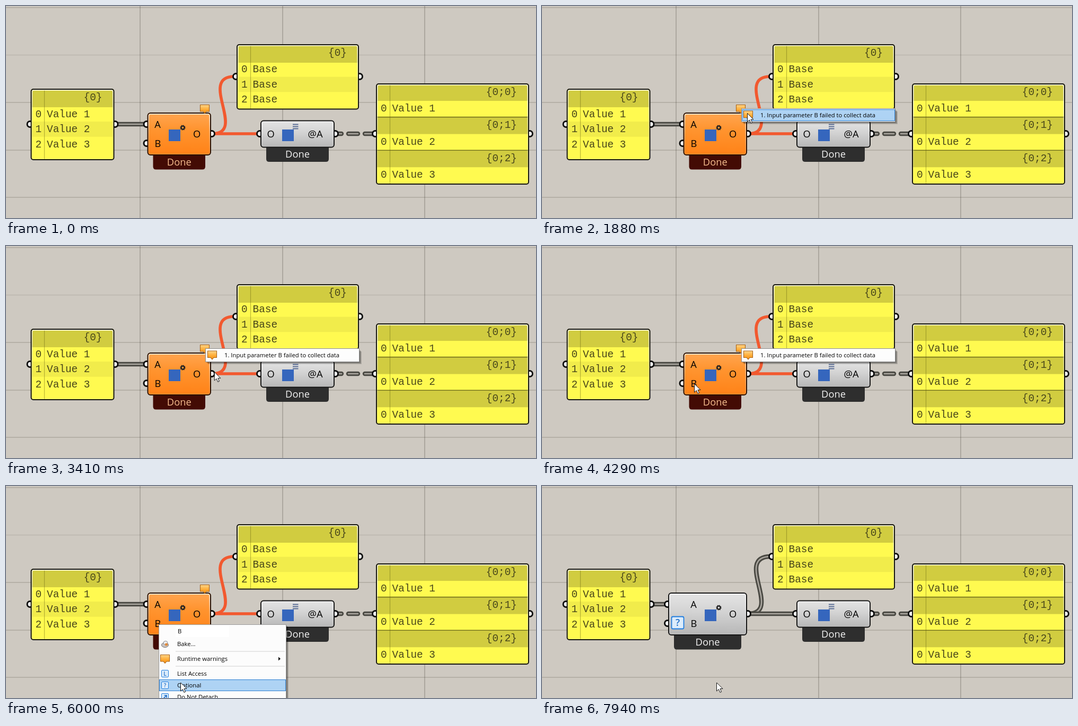
These frames come from a looping animation (1000 px wide and 400 px high, 8000 ms). An HTML page:

```html
<!DOCTYPE html>
<html lang="en">
<head>
<meta charset="utf-8">
<title>Node canvas</title>
<style>
html, body { margin: 0; width: 100%; height: 100%; overflow: hidden; background: #cec9c1; }
svg { display: block; width: 100vw; height: 100vh; }
text { white-space: pre; }
.mono { font: 19.4px "Liberation Mono", monospace; fill: #48461a; }
.ui { font: 18.3px "Open Sans", sans-serif; }
.menu { font: 11.25px "Open Sans", sans-serif; fill: #000; }
</style>
</head>
<body>
<svg id="stage" viewBox="0 0 1000 400" xmlns="http://www.w3.org/2000/svg"></svg>
<script>
const LOOP = 8000;
const CLICK_BALLOON = 1500, HOVER_ITEM = 1710, TIP_ON = 2400, LEAVE_ITEM = 3060;
const OPEN_MENU = 4620, PICK = 7470, FINISH = 7720;

// Cursor keys: time, x, y
const PATH = [
  [60, 440, 290], [400, 432, 282], [1250, 376, 193.5], [1500, 376, 193.5], [1800, 387, 202],
  [2000, 387, 202], [2400, 412, 214], [2750, 414, 215], [2940, 434, 222.5],
  [3150, 428, 230], [3950, 287, 259.5], [4900, 287, 259.5], [5850, 329, 370.5], [8000, 329, 370.5]
];

const line = (x1, y1, x2, y2, color, w = 1) =>
  `<path d="M${x1} ${y1}L${x2} ${y2}" stroke="${color}" stroke-width="${w}"/>`;
const rect = (x, y, w, h, fill, extra = "") =>
  `<rect x="${x}" y="${y}" width="${w}" height="${h}" fill="${fill}" ${extra}/>`;
const port = (x, y) =>
  `<circle cx="${x}" cy="${y}" r="5.5" fill="#fff" stroke="#0c0c0c" stroke-width="3"/>`;
const group = (id, body) => `<g id="${id}">${body}</g>`;

function label(cls, s, x, y, anchor = "start", fill = "") {
  const drop = { mono: 6.2, ui: 6.5, menu: 4 }[cls];
  const color = fill ? ` style="fill:${fill}"` : "";
  return `<text class="${cls}" x="${x}" y="${y + drop}" text-anchor="${anchor}"${color}>${s}</text>`;
}

function grid() {
  const rows = [[3, .2], [92.5, .11], [182, .2], [272, .2], [361, .2]];
  return rows.map(([y, a]) => line(0, y, 1000, y, `rgba(40,35,25,${a})`, 1.7)).join("") +
    [253, 522, 790].map(x => line(x, 0, x, 400, "rgba(40,35,25,.23)", 1.7)).join("");
}

// Dark outline with a light inner rim that fades downwards
const frame = (x, y, w, h, r, edge) =>
  rect(x + 1.7, y + 1.7, w - 3.4, h - 3.4, "none", `rx="${r - 1}" stroke="url(#rim)" stroke-width="1.6"`) +
  rect(x, y, w, h, "none", `rx="${r}" stroke="${edge}" stroke-width="2"`);

// Each branch: top, header bottom, path label, row values
function panel(x, y, w, h, split, branches) {
  const clip = `clip${x}`;
  let s = `<clipPath id="${clip}">${rect(x, y, w, h, "#000", 'rx="4"')}</clipPath>`;
  s += `<g clip-path="url(#${clip})">` + rect(x, y, w, h, "#fffa50");
  for (const b of branches) {
    s += rect(x, b.top, w, b.head - b.top, "#d1cc40");
    if (b.top > y) s += line(x, b.top, x + w, b.top, "#77741c", 1.6);
    s += label("mono", b.path, x + w - 22, b.pathY, "end");
    b.rows.forEach((v, i) => {
      const cy = b.rowY + i * 28.6;
      if (i % 2) s += rect(x, cy - 14, w, 28.6, "#f1ec4b");
      s += label("mono", i, x + 8, cy) + label("mono", v, x + 29.5, cy);
    });
  }
  s += line(x + split, y, x + split, y + h, "rgba(90,86,10,.4)", 1.2) + "</g>";
  return s + frame(x, y, w, h, 4, "#17170f");
}

function node(x, y, w, h, fill, edge, tag, tagFill, tagInk) {
  const b = y + h, l = x + 10, r = x + w - 10;
  return `<path d="M${l} ${b}H${r}V${b + 22}q0 5.5-5.5 5.5H${l + 5.5}q-5.5 0-5.5-5.5Z" fill="${tagFill}"/>` +
    label("ui", tag, x + w / 2, b + 13.3, "middle", tagInk) +
    rect(x, y, w, h, `url(#${fill})`, 'rx="5"') + frame(x, y, w, h, 5, edge);
}

const badge = (x, y) => rect(x - 11, y - 11, 22, 22, "#3566bd");

const gear = `<g transform="translate(333.5 229.5)"><circle r="3.1" fill="none" stroke="#222" stroke-width="2.4"/>` +
  `<circle r="4.5" fill="none" stroke="#222" stroke-width="1.2" stroke-dasharray="1.8 1.73"/></g>`;

const mergeParts = label("ui", "A", 286, 223.5, "middle") + label("ui", "B", 286.5, 259.5, "middle") +
  label("ui", "O", 360, 241.5, "middle") + badge(318, 244) + gear;

const balloon = (x, y) =>
  `<path d="M${x - 8.5} ${y - 7}h17v12.5h-5.5l-3 3.5-3-3.5h-5.5Z" fill="url(#amber)" stroke="#a86216" stroke-width="1.1" stroke-linejoin="round"/>`;

const tile = (x, y, size, s, font) =>
  rect(x - size / 2, y - size / 2, size, size, "#dcecfb", `rx="${size / 9}" stroke="#1f7de0" stroke-width="${size / 13}"`) +
  `<text x="${x}" y="${y + font * .36}" text-anchor="middle" style="font:600 ${font}px 'Open Sans',sans-serif" fill="#2370c8">${s}</text>`;

const CURVE = "M389 241C455 241 362 133 431 133", STRAIGHT = "M389 241H476";
const flatWire = d => `<path d="${d}" fill="none" stroke="#f2592f" stroke-width="5.6"/>`;
const tubeWire = (d, cap = "butt") => [["#4a4943", 8.4], ["#aaa69f", 2.6]].map(([c, w]) =>
  `<path d="${d}" fill="none" stroke="${c}" stroke-width="${w}" stroke-linecap="${cap}"/>`).join("");

function mergeNode(id, x, fill, edge, tag, tagFill, tagInk, extra = "") {
  return group(id, tubeWire(`M208 223H${x - 5}`) + port(205.5, 223) + port(x - 2, 223) + port(x - 2, 259) +
    node(x, 202, 386 - x, 79, fill, edge, tag, tagFill, tagInk) + mergeParts + extra);
}

const optionalTile = tile(256, 258, 23, "?", 18);
const gradient = (id, stops) => `<linearGradient id="${id}" x2="0" y2="1">` +
  stops.map(([o, c]) => `<stop offset="${o}" stop-color="${c}"/>`).join("") + "</linearGradient>";

const defs = "<defs>" + gradient("grey", [[0, "#e4e4e4"], [.45, "#d3d3d3"], [1, "#b6b6b6"]]) +
  gradient("orange", [[0, "#ffa550"], [.4, "#ff942f"], [1, "#ff8217"]]) +
  gradient("rim", [[0, "rgba(255,255,255,.9)"], [.5, "rgba(255,255,255,.35)"], [1, "rgba(255,255,255,.1)"]]) +
  gradient("amber", [[0, "#ffd58a"], [.5, "#ffb03c"], [1, "#f58e10"]]) + "</defs>";

const shadow = (x, y, w, h) => [5, 4, 3, 2].map(d => rect(x + d, y + d, w, h, "rgba(0,0,0,.14)")).join("");
const glow = (id, x, y, w, h) => rect(x, y, w, h, "#aed3f4", `id="${id}" stroke="#2c7fd2"`);

const popup = group("popup", shadow(376, 194, 290, 24) +
  rect(376.5, 193.5, 290, 25, "#fdfdfd", 'stroke="#8c8c8c"') + glow("popupGlow", 378, 195.5, 287.5, 21) +
  balloon(389, 205) + label("menu", "1. Input parameter B failed to collect data", 412, 205.7));

const tip = group("tip", shadow(412, 236, 219, 20) +
  rect(412.5, 236.5, 220, 20, "#fff", 'stroke="#767676"') +
  `<text class="menu" x="418" y="251" style="font-size:11.5px;fill:#3c3c3c">Click to copy warning text to clipboard.</text>`);

const ITEMS = [["Bake...", 298], ["Runtime warnings", 326], ["List Access", 354], ["Optional", 376], ["Do Not Detach", 398]];
const bakeIcon = `<ellipse cx="300" cy="300" rx="6.5" ry="4.5" fill="#c8c4c4" stroke="#77706c"/>` +
  `<ellipse cx="301" cy="296" rx="4" ry="3.5" fill="#eef0f3" stroke="#8a8a90"/><circle cx="302.5" cy="299" r="2.6" fill="#e08a3c"/>`;
const menu = group("menu", shadow(288, 261, 240, 160) +
  rect(288.5, 261.5, 240, 170, "#fcfcfc", 'stroke="#9a9a9a"') +
  rect(320, 264, 101, 21, "#fff") + label("menu", "B", 324, 273.5) +
  [312, 340].map(y => line(320, y, 526, y, "#d0d0d0")).join("") +
  glow("itemGlow", 289.5, 0, 238, 21) +
  ITEMS.map(([s, y]) => label("menu", s, 323, y)).join("") +
  bakeIcon + balloon(300, 325.5) + '<path d="M514 322.5v7l4-3.5Z" fill="#111"/>' +
  tile(300, 354, 13, "L", 10) + tile(300, 376, 13, "?", 10) + tile(300, 398, 13, "", 10) +
  '<path d="M297 401l6-6m-4.5 0h4.5v4.5" fill="none" stroke="#2370c8" stroke-width="1.7"/>');

const cursor = `<path id="cursor" d="M.5.5V16.5L4.3 13 7 19 9.6 17.8 7 12H12Z" fill="#fff" stroke="#151515" stroke-width="1" stroke-linejoin="round"/>`;

const $ = id => document.getElementById(id);

$("stage").innerHTML = defs + grid() +
  group("hotWires", flatWire(CURVE) + flatWire(STRAIGHT)) +
  group("coolWires", tubeWire(CURVE) + tubeWire(STRAIGHT)) +
  tubeWire("M626 241H633M646 241H664M677 241H692", "round") +
  [[45.5, 223], [388, 241], [479, 241], [621, 241], [434, 133], [667, 133], [697, 241], [988, 241]].map(p => port(...p)).join("") +
  mergeNode("warnNode", 267.5, "orange", "#2a1204", "Done", "#430b04", "#f6bd8e", balloon(375, 193.5)) +
  mergeNode("busyNode", 239, "grey", "#161616", "Creating...", "#2e2e2e", "#f4f4f4", optionalTile) +
  mergeNode("doneNode", 239, "grey", "#161616", "Done", "#2e2e2e", "#f4f4f4", optionalTile) +
  node(481, 216.5, 138, 50, "grey", "#161616", "Done", "#2e2e2e", "#f4f4f4") +
  label("ui", "O", 499.5, 241.5, "middle") + label("ui", "@A", 583.5, 241.5, "middle") + badge(532, 244) +
  [223.5, 227.5, 231.5].map(y => line(541, y, 551.5, y, "#5c6f96", 2)).join("") +
  panel(47.5, 157, 156, 133, 25,
    [{ top: 157, head: 191, path: "{0}", pathY: 172, rowY: 203.5, rows: ["Value 1", "Value 2", "Value 3"] }]) +
  panel(436, 73, 229, 121.5, 25.5,
    [{ top: 73, head: 107, path: "{0}", pathY: 88, rowY: 119, rows: ["Base", "Base", "Base"] }]) +
  panel(699, 147, 287, 189, 25.5, [1, 2, 3].map((n, i) => {
    const top = 147 + i * 62.6;
    return { top, head: top + 32, path: `{0;${i}}`, pathY: top + 14.3, rowY: top + 45.8, rows: ["Value " + n] };
  })) +
  popup + menu + tip + cursor;

function pointer(t) {
  let i = 1;
  while (i < PATH.length - 1 && t > PATH[i][0]) i++;
  const [t0, x0, y0] = PATH[i - 1], [t1, x1, y1] = PATH[i];
  const u = Math.min(1, Math.max(0, (t - t0) / (t1 - t0))), e = u * u * (3 - 2 * u);
  return [x0 + (x1 - x0) * e, y0 + (y1 - y0) * e];
}

const show = (id, on) => { $(id).style.display = on ? "" : "none"; };

function render(t) {
  const [x, y] = pointer(t);
  show("cursor", t >= 60);
  $("cursor").setAttribute("transform", `translate(${x} ${y})`);
  show("popup", t >= CLICK_BALLOON && t < OPEN_MENU);
  show("popupGlow", t >= HOVER_ITEM && t < LEAVE_ITEM);
  show("tip", t >= TIP_ON && t < LEAVE_ITEM);
  show("menu", t >= OPEN_MENU && t < PICK);
  const hit = ITEMS.find(([, cy]) => Math.abs(y - cy) <= 11);
  show("itemGlow", !!hit);
  if (hit) $("itemGlow").setAttribute("y", hit[1] - 10.5);
  show("warnNode", t < PICK);
  show("busyNode", t >= PICK && t < FINISH);
  show("doneNode", t >= FINISH);
  show("hotWires", t < FINISH);
  show("coolWires", t >= FINISH);
}

function tick() {
  render(performance.now() % LOOP);
  requestAnimationFrame(tick);
}
tick();
</script>
</body>
</html>
```
